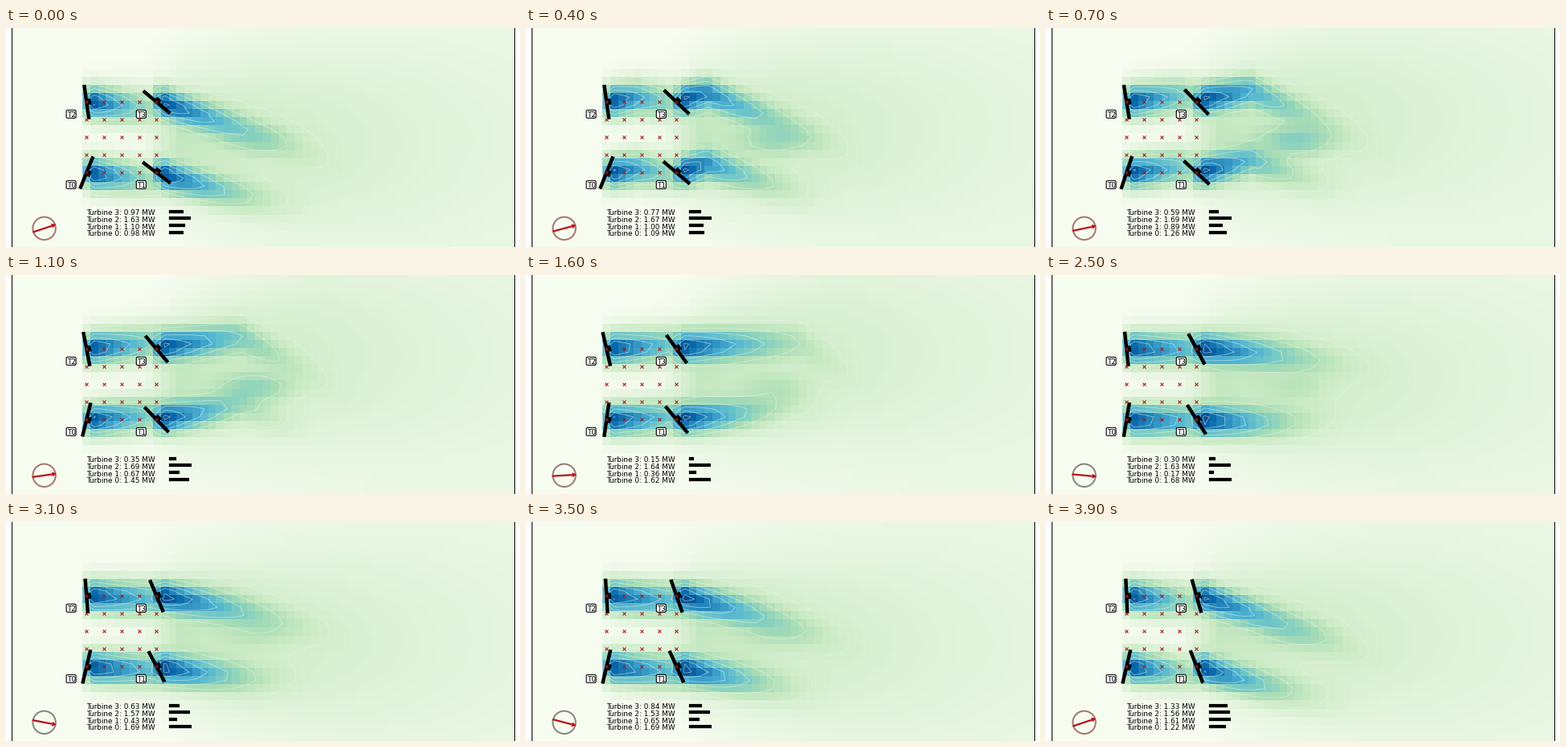
A matplotlib script that plays this animation: 640 px wide and 273 px high, repeating every 4000 ms.

```python
import numpy as np
import matplotlib.pyplot as plt
from matplotlib.animation import FuncAnimation
from matplotlib.patches import Circle, FancyBboxPatch, Polygon

W, H, DPI = 640, 273, 100
FRAMES, STEP = 40, 100
LEFT, RIGHT = 7, 633
COLS, ROWS = 64, 27

SWING, PERIOD = 18.5, 3.9   # wind turns from +SWING to -SWING degrees, then jumps back
FLOW = 95                   # wake travel in pixels per second
RATED = 1.69
HUBS = [(x, y) for y in (180.3, 92.3) for x in (100.3, 187.5)]
RED = "#b90c13"
GREY, BROWN = np.array([0.53, 0.52, 0.49]), np.array([0.65, 0.46, 0.43])

xs = LEFT + (np.arange(COLS) + 0.5) * (RIGHT - LEFT) / COLS
ys = (np.arange(ROWS) + 0.5) * H / ROWS
X, Y = np.meshgrid(xs, ys)


def px(n):
    """Pixels to points."""
    return n * 72 / DPI


def bell(u):
    return np.exp(-0.5 * u ** 2)


def wind(t):
    return SWING * (1 - 2 * (t % PERIOD) / PERIOD)


def wind_sum(t):
    """Integral of the wind angle over time."""
    p = t % PERIOD
    return SWING * p * (1 - p / PERIOD)


def tilts(t):
    """Rotor tilt of each turbine in degrees."""
    return [
        np.interp(t, [0.4, 1.6, 2.5, 3.1], [-22, -8, -9.5, -13.3]),
        53 - 8.2 * t,
        np.interp(t, [0.4, 1.6, 2.5, 3.9], [8, 13, 6, 2.5]),
        50 - 8.8 * t,
    ]


def powers(t):
    """Output falls with yaw error, and for rear turbines inside a wake."""
    w = wind(t)
    shade = [0, 0.87 * np.exp(-((w + 3) / 12.5) ** 2),
             0, 0.9 * np.exp(-((w - 1) / 14.5) ** 2)]
    return [RATED * np.cos(np.radians(a - w)) ** 2 * (1 - s)
            for a, s in zip(tilts(t), shade)]


def wake(t, x0, y0, reach, sway, bend):
    """Deficit behind a rotor, carried sideways by the past wind."""
    run = np.clip(X - x0, 0, None)
    drift = np.radians(wind_sum(t) - wind_sum(t - run / FLOW)) * FLOW
    centre = y0 - sway * drift + bend * (run / 160) ** 2
    start = np.select([X < x0 - 6, X < x0 + 2], [0, 0.72], 1.0)
    far = np.clip(run - 10, 0, None)
    fade = np.exp(-far / reach - (far / (1.6 * reach)) ** 4)
    return 0.93 * start * fade * bell((Y - centre) / (14.5 + 0.04 * run))


def field(t):
    p = t % PERIOD
    front = 85 + 60 * min(p / 2.5, 1)
    run = np.clip(X - 190, 0, None)
    far_y = 136 - (12 + 27 * np.cos(2 * np.pi * (p - 1.45) / PERIOD)) \
        * np.clip(run / 200, 0, 1)
    far = (0.3 * np.clip((X - 165) / 50, 0, 1) * np.exp(-run / 400)
           * bell((Y - far_y) / (48 + 0.26 * run)))
    merge = 0.27 + 0.2 * bell((p - 0.8) / 0.4)
    patch = merge * bell((X - 310) / 45) * bell((Y - 140) / 18)
    parts = [
        far, patch,
        wake(t, 100.3, 180.5, front, 0.4, 0),
        wake(t, 100.3, 91.5, front, 0.4, 0),
        wake(t, 188, 180, 120, 1, 8),
        wake(t, 188, 91, 150, 1, 25),
    ]
    return sum(q ** 3 for q in parts) ** (1 / 3)


fig = plt.figure(figsize=(W / DPI, H / DPI), dpi=DPI, facecolor="white")
ax = fig.add_axes([0, 0, 1, 1])
ax.axis("off")

image = ax.imshow(field(0), cmap="GnBu", vmin=0, vmax=1, aspect="auto",
                  interpolation="nearest", extent=(LEFT, RIGHT, H, 0))
ax.set_xlim(0, W)
ax.set_ylim(H, 0)
for x in (LEFT, RIGHT):
    ax.plot([x, x], [-2, H + 2], color="black", lw=px(1))


def bar(width, cap, z):
    return ax.plot([], [], color="black", lw=px(width),
                   solid_capstyle=cap, zorder=z)[0]


rotors, nacelles, labels, bars = [], [], [], []
for n, (hx, hy) in enumerate(HUBS):
    rotors.append(bar(4.4, "butt", 4))
    nacelles.append(bar(7.5, "butt", 4))
    bars.append(bar(4.2, "projecting", 6))
    cx, cy = hx - 19.2, hy + 15
    ax.add_patch(FancyBboxPatch((cx - 4.7, cy - 3.7), 9.4, 7.4,
                                boxstyle="round,pad=1.3,rounding_size=1.6",
                                fc="white", ec="black", lw=px(1.1), zorder=6))
    ax.text(cx, cy + 3.4, f"T{n}", fontsize=px(8.85), ha="center",
            va="baseline", zorder=7)
    labels.append(ax.text(100.2, 233.4 + 8.67 * (3 - n), "",
                          fontsize=px(8.85), va="baseline", zorder=6))

gx, gy = np.meshgrid(100.3 + 21.75 * np.arange(5), 92.1 + 22 * np.arange(5))
ax.plot(gx.ravel(), gy.ravel(), "x", color="#a51a1c", ms=px(4), mew=px(1.05),
        zorder=5)

dial = np.array([47.6, 249.8])
ring = ax.add_patch(Circle(dial, 14.2, fill=False, lw=px(2), zorder=6))
shaft, = ax.plot([], [], color=RED, lw=px(2.2), solid_capstyle="butt", zorder=7)
head = ax.add_patch(Polygon([(0, 0), (1, 0), (0, 1)], fc=RED, lw=0, zorder=7))
contours = []


def draw_turbine(n, tilt, power):
    hx, hy = HUBS[n]
    s, c = np.sin(np.radians(tilt)), np.cos(np.radians(tilt))
    rotors[n].set_data([hx - 21.7 * s, hx + 21.7 * s],
                       [hy - 21.7 * c, hy + 21.7 * c])
    nacelles[n].set_data([hx, hx + 5.6 * c], [hy, hy - 5.6 * s])
    labels[n].set_text(f"Turbine {n}: {power:.2f} MW")
    y = 228.7 + 8.67 * (3 - n)
    bars[n].set_data([205, 205 + 14.2 * power], [y, y])


def draw_wind(angle):
    a = np.radians(angle)
    along = np.array([np.cos(a), -np.sin(a)])
    side = np.array([np.sin(a), np.cos(a)])
    tail, neck, tip = (dial + r * along for r in (-15, 10, 15.5))
    shaft.set_data([tail[0], neck[0]], [tail[1], neck[1]])
    head.set_xy([tip, neck + 3 * side, neck - 3 * side])
    ring.set_edgecolor(GREY + (BROWN - GREY) * np.clip(angle / 8, 0, 1))


def update(i):
    t = i * STEP / 1000
    z = field(t)
    image.set_data(z)
    while contours:
        contours.pop().remove()
    contours.append(ax.contour(xs, ys, z, levels=np.linspace(0.2, 0.9, 6),
                               colors="#eaf6ea", alpha=0.5,
                               linewidths=px(0.9), zorder=3))
    for n, (tilt, power) in enumerate(zip(tilts(t), powers(t))):
        draw_turbine(n, tilt, power)
    draw_wind(wind(t))
    return []


anim = FuncAnimation(fig, update, frames=FRAMES, interval=STEP, repeat=True,
                     repeat_delay=0, init_func=lambda: update(0), blit=False)
plt.show()
```
